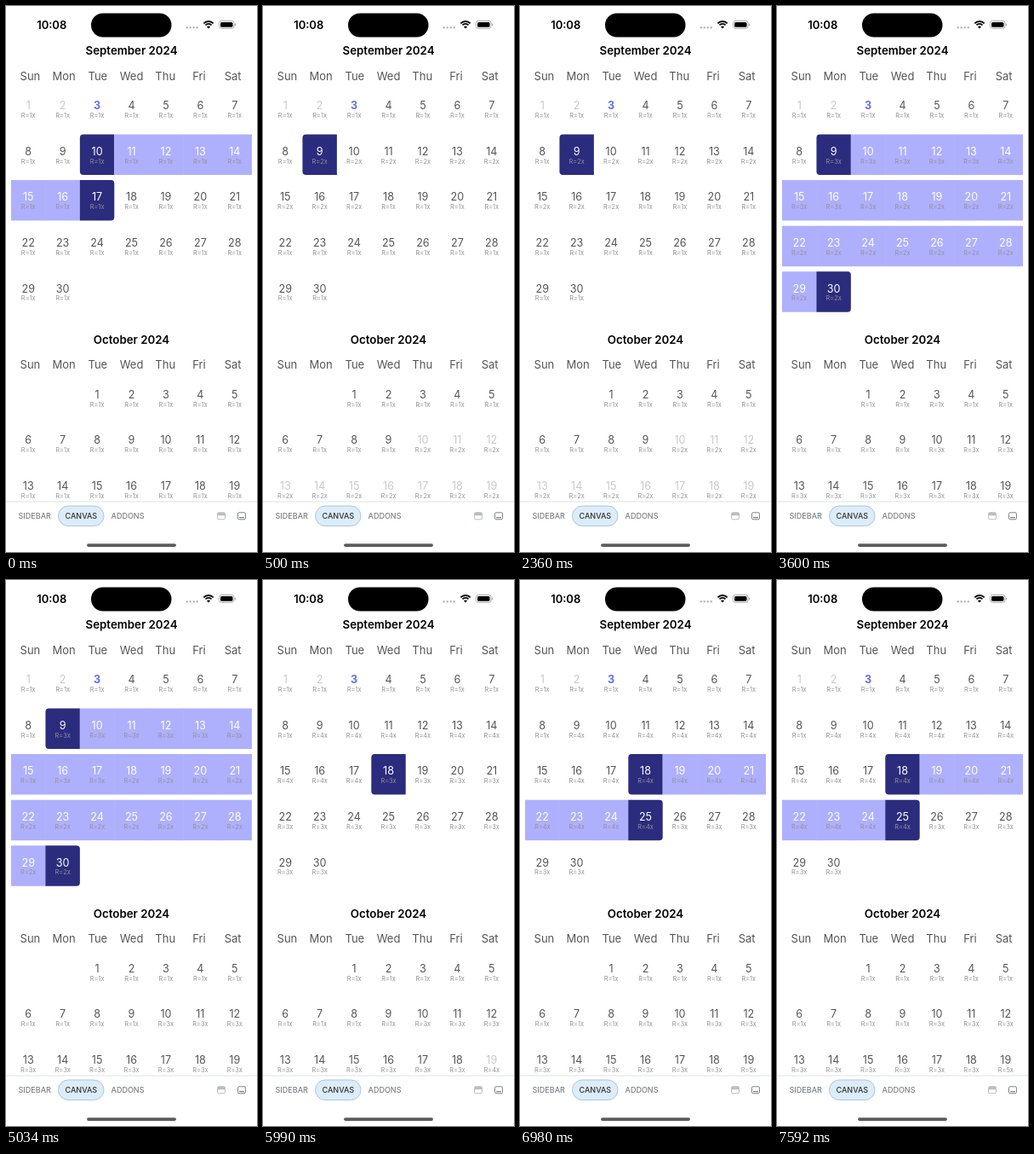
Write an HTML page with a canvas that moves like this. It is 295 px wide and 640 px high and loops after 8000 ms.

```html
<!DOCTYPE html>
<html lang="en">
<head>
<meta charset="utf-8">
<title>Calendar range selection</title>
<style>
  html, body { margin: 0; width: 100%; height: 100%; overflow: hidden; background: #fff; }
  canvas { display: block; width: 295px; height: 640px; }
</style>
</head>
<body>
<canvas></canvas>
<script>
const W = 295, H = 640, LOOP = 8000;
const LEFT = 6, CELL_W = 283 / 7, CELL_H = 47.5, ROW_STEP = 53.6;
const NAVY = '#2b2c7e', LAVENDER = '#aeb0fd', TEXT = '#555', MUTED = '#c9c9c9', LABEL = '#929292';
const WEEKDAYS = ['Sun', 'Mon', 'Tue', 'Wed', 'Thu', 'Fri', 'Sat'];
const TODAY = 3;

// Days are counted from September 1, so October 1 is day 31.
const MONTHS = [
  { title: 'September 2024', y: 52.5, offset: 0, before: 0, days: 30 },
  { title: 'October 2024', y: 391, offset: 2, before: 30, days: 19 }
];

// Each step sets the selection and re-renders the listed day ranges once.
const STEPS = [
  { at: 0, start: 10, end: 17, renders: [] },
  { at: 500, start: 9, limit: 40, renders: [[9, 17], [40, 49]] },
  { at: 3600, start: 9, end: 30, renders: [[9, 30], [40, 49]] },
  { at: 5990, start: 18, limit: 49, renders: [[9, 30], [49, 49]] },
  { at: 6980, start: 18, end: 25, renders: [[18, 25], [49, 49]] }
];

const canvas = document.querySelector('canvas');
const ctx = canvas.getContext('2d');
const scale = window.devicePixelRatio || 1;
canvas.width = W * scale;
canvas.height = H * scale;

function text(str, x, y, size, color, weight = 400, align = 'center') {
  ctx.font = `${weight} ${size}px Inter, sans-serif`;
  ctx.textAlign = align;
  ctx.fillStyle = color;
  ctx.fillText(str, x, y);
}

function box(x, y, w, h, radius, fill, stroke) {
  ctx.beginPath();
  ctx.roundRect(x, y, w, h, radius);
  if (fill) {
    ctx.fillStyle = fill;
    ctx.fill();
  }
  if (stroke) {
    ctx.strokeStyle = stroke;
    ctx.lineWidth = 1;
    ctx.stroke();
  }
}

function renderCount(day, stepIndex) {
  return 1 + STEPS.slice(0, stepIndex + 1)
    .flatMap(step => step.renders)
    .filter(([from, to]) => day >= from && day <= to).length;
}

function drawDay(day, number, col, top, stepIndex) {
  const { start, end, limit = Infinity } = STEPS[stepIndex];
  const x = LEFT + col * CELL_W;
  const center = x + CELL_W / 2;
  const isStart = day === start, isEnd = day === end;
  const selected = isStart || (day > start && day <= end);
  let color = day < TODAY || day >= limit ? MUTED : TEXT;
  let weight = 400;

  if (selected) {
    const l = isStart ? 4 : 0, r = isEnd ? 4 : 0;
    const overlap = col < 6 && !isEnd && !isStart ? 0.5 : 0;
    box(x, top, CELL_W + overlap, CELL_H, [l, r, r, l], isStart || isEnd ? NAVY : LAVENDER);
    color = '#fff';
  } else if (day === TODAY) {
    color = '#6a6be8';
    weight = 700;
  }
  text(number, center, top + 24.3, 12.6, color, weight);
  text(`R=${renderCount(day, stepIndex)}x`, center, top + 34.1, 7.4, LABEL);
}

function drawMonth(month, stepIndex) {
  text(month.title, 147.5, month.y + 4.8, 13.3, '#000', 600);
  WEEKDAYS.forEach((name, i) => text(name, 28.4 + 39.7 * i, month.y + 34.3, 13, TEXT));
  for (let n = 1; n <= month.days; n++) {
    const slot = month.offset + n - 1;
    const top = month.y + 44.4 + Math.floor(slot / 7) * ROW_STEP;
    drawDay(month.before + n, n, slot % 7, top, stepIndex);
  }
}

function drawStatusBar() {
  text('10:08', 53.7, 26.7, 13, '#000', 600);
  box(100, 8.5, 94.5, 28, 14, '#000');
  for (let i = 0; i < 4; i++) box(211.5 + i * 4, 24, 2.5, 2.5, 1.25, '#bbb');

  ctx.strokeStyle = '#000';
  ctx.lineWidth = 1.8;
  for (const r of [8, 5]) {
    ctx.beginPath();
    ctx.arc(238, 26, r, -Math.PI * 0.75, -Math.PI * 0.25);
    ctx.stroke();
  }
  ctx.beginPath();
  ctx.moveTo(238, 26.5);
  ctx.arc(238, 26.5, 2.8, -Math.PI * 0.75, -Math.PI * 0.25);
  ctx.fillStyle = '#000';
  ctx.fill();

  box(250.5, 17.5, 17.5, 8.8, 2.8, null, '#aaa');
  box(252, 19, 14.5, 5.8, 1.6, '#000');
  box(269, 20.4, 1.2, 3, 0.6, '#aaa');
}

function drawToolbar() {
  box(0, 580, W, 60, 0, '#fff');
  box(0, 580.5, W, 1, 0, '#dfe3e6');
  box(61.5, 586, 53.5, 23.5, 11.75, '#ddecf9', '#a5c8e2');
  text('SIDEBAR', 33.7, 601.3, 9, '#798289', 500);
  text('CANVAS', 88.3, 601.3, 9, '#2e3438', 500);
  text('ADDONS', 143, 601.3, 9, '#798289', 500);

  box(248.5, 593.8, 9, 8, 1.5, null, '#b9bec2');
  box(248.5, 593.8, 9, 3.5, [1.5, 1.5, 0, 0], '#b9bec2');
  box(272.5, 593.8, 9, 8, 1.5, null, '#798289');
  box(274, 599, 6, 1.2, 0, '#798289');
  box(95, 630.3, 105, 3.6, 1.8, '#5c5c5c');
}

function frame(now) {
  const t = now % LOOP;
  const stepIndex = STEPS.findLastIndex(step => t >= step.at);
  ctx.setTransform(scale, 0, 0, scale, 0, 0);
  box(0, 0, W, H, 0, '#fff');
  drawStatusBar();
  MONTHS.forEach(month => drawMonth(month, stepIndex));
  drawToolbar();
  requestAnimationFrame(() => frame(performance.now() - began));
}

const began = performance.now();
frame(0);
</script>
</body>
</html>
```
